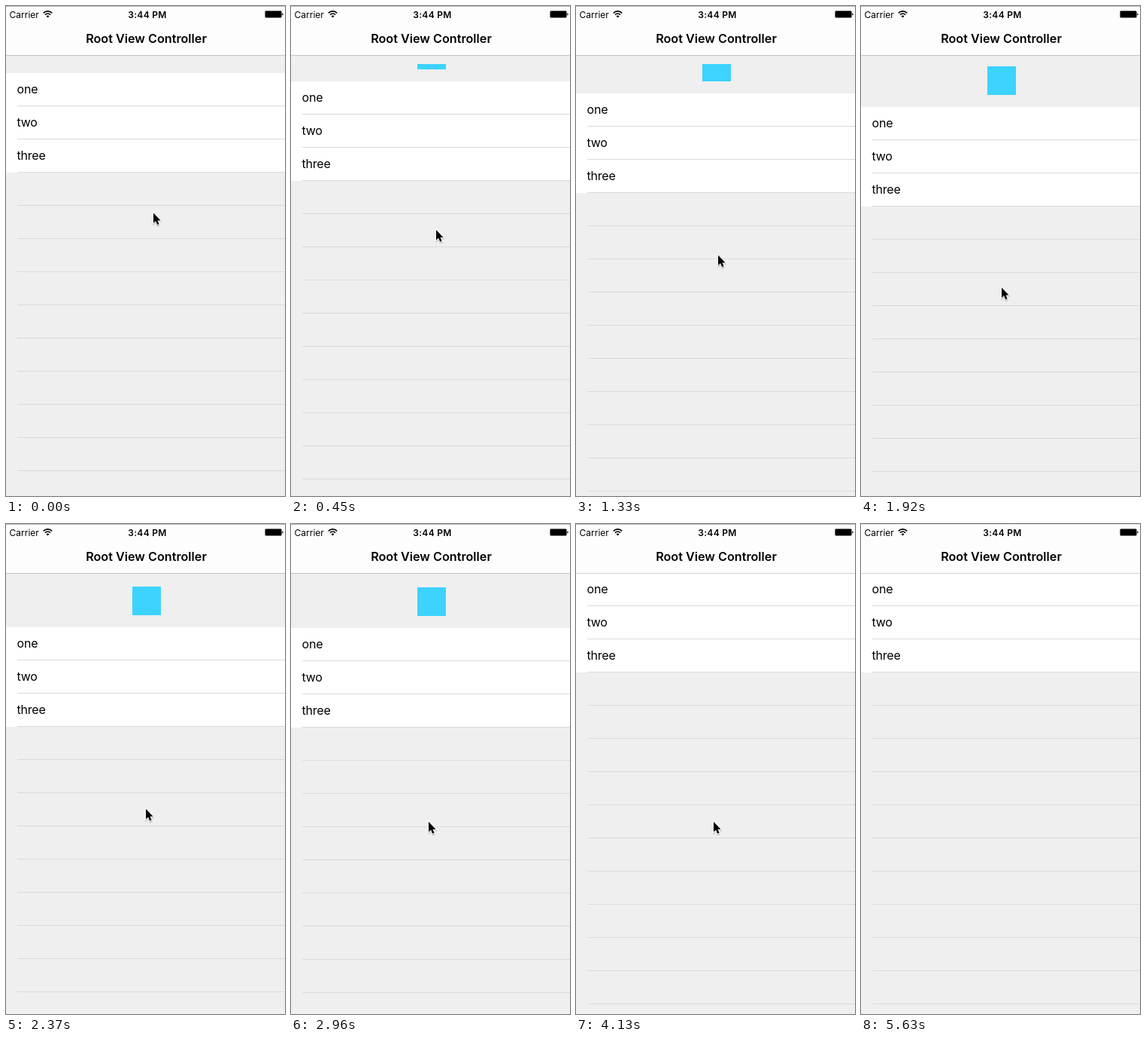
An HTML page that plays this animation: 371 by 650 pixels, repeating every 5.7 s.

```html
<!DOCTYPE html>
<html lang="en">
<head>
<meta charset="utf-8">
<title>Pull to refresh</title>
<style>
html, body { margin: 0; width: 100%; height: 100%; overflow: hidden; background: #efefef; }
svg { display: block; width: 371px; height: 650px; }
text { font: 16px Inter, Roboto, sans-serif; }
.row { letter-spacing: -.2px; }
.title { font-size: 16.2px; font-weight: 600; text-anchor: middle; }
.status { font-size: 12px; }
.clock { font-size: 12px; font-weight: 600; letter-spacing: .3px; text-anchor: middle; }

.pull, .cursor, .edge { animation: pull 5700ms step-end infinite; }
.cursor { animation-name: drag, vanish; }
.edge { animation-name: edge; }

/* steps(n) advances once per screen refresh of about 148 ms */
@keyframes pull {
  0%     { transform: translateY(89px); }
  2.6%   { transform: translateY(92px);  animation-timing-function: steps(2); }
  7.85%  { transform: translateY(100px); animation-timing-function: steps(2); }
  12.9%  { transform: translateY(104px); animation-timing-function: steps(5); }
  25.9%  { transform: translateY(119px); animation-timing-function: steps(3); }
  33.6%  { transform: translateY(134px); animation-timing-function: steps(3); }
  41.5%  { transform: translateY(137px); }
  44%    { transform: translateY(142px); }
  46.6%  { transform: translateY(146px); animation-timing-function: steps(2); }
  51.85% { transform: translateY(138px); }
  64.7%  { transform: translateY(126px); }
  67.3%  { transform: translateY(96px); }
  69.95% { transform: translateY(70px); }
  72.4%, 100% { transform: translateY(65px); }
}
@keyframes drag {
  0%    { transform: translate(196px, 274.5px); animation-timing-function: steps(3); }
  7.85% { transform: translate(193px, 297px);   animation-timing-function: steps(6); }
  23.3% { transform: translate(189px, 330.5px); animation-timing-function: steps(4); }
  33.6% { transform: translate(187px, 373.5px); animation-timing-function: steps(3); }
  41.5% { transform: translate(186px, 378px);   animation-timing-function: steps(2); }
  46.6%, 100% { transform: translate(183px, 395px); }
}
@keyframes vanish {
  0%     { opacity: 1; }
  80.3%  { opacity: .4; }
  82.95%, 100% { opacity: 0; }
}
@keyframes edge {
  0%    { fill: #b4b4b4; }
  98.7%, 100% { fill: #dcdcdc; }
}
</style>
</head>
<body>
<svg viewBox="0 0 371 650">
  <clipPath id="slot"><path d="M0 77H371V650H0Z"/></clipPath>
  <path fill="#efefef" d="M0 0H371V650H0Z"/>

  <g clip-path="url(#slot)">
    <rect class="pull" x="168" y="-54" width="38" height="38" fill="#3cd3ff"/>
  </g>

  <g class="pull">
    <path fill="#fff" d="M0 0H371V132H0Z"/>
    <path d="M193 43V620" stroke="#dadada" stroke-width="356" stroke-dasharray="1 43"/>
    <text class="row" x="14.5" y="27">one</text>
    <text class="row" x="14.5" y="71">two</text>
    <text class="row" x="14.5" y="115">three</text>
  </g>

  <path fill="#fdfdfd" d="M0 0H371V65H0Z"/>
  <path fill="#000" fill-opacity=".18" d="M0 65H371V66H0Z"/>
  <path class="edge" d="M0 0H371V1H0Z"/>

  <text class="status" x="4.6" y="15.5">Carrier</text>
  <g fill="none" stroke="#000" stroke-width="1.7">
    <path d="M49.8 9.3a8 8 0 0 1 11.4 0M52 11.6a5 5 0 0 1 7 0"/>
    <path d="M53.5 13.4a2.8 2.8 0 0 1 4 0L55.5 15.5Z" fill="#000" stroke="none"/>
  </g>
  <text class="clock" x="188" y="15.5">3:44 PM</text>
  <rect x="344.5" y="6.5" width="22" height="9" rx="1.5" fill="#fdfdfd" stroke="#777"/>
  <path d="M345 7H366V15H345ZM367.3 9.5q1.4 .3 1.4 1.5t-1.4 1.5Z"/>
  <text class="title" x="186.5" y="49">Root View Controller</text>

  <g class="cursor">
    <path d="M0 1.5V15.5L3.2 12.6 5.3 17.6 8 16.5 6 11.6H10Z" fill="#000" opacity=".18" stroke="#000" stroke-width="1.5"/>
    <path d="M0 0V13.6L3.1 10.7 5.2 15.8 7.6 14.8 5.5 9.9H9.6Z" stroke="#fff" stroke-width="1.6" paint-order="stroke"/>
  </g>
</svg>
</body>
</html>
```
